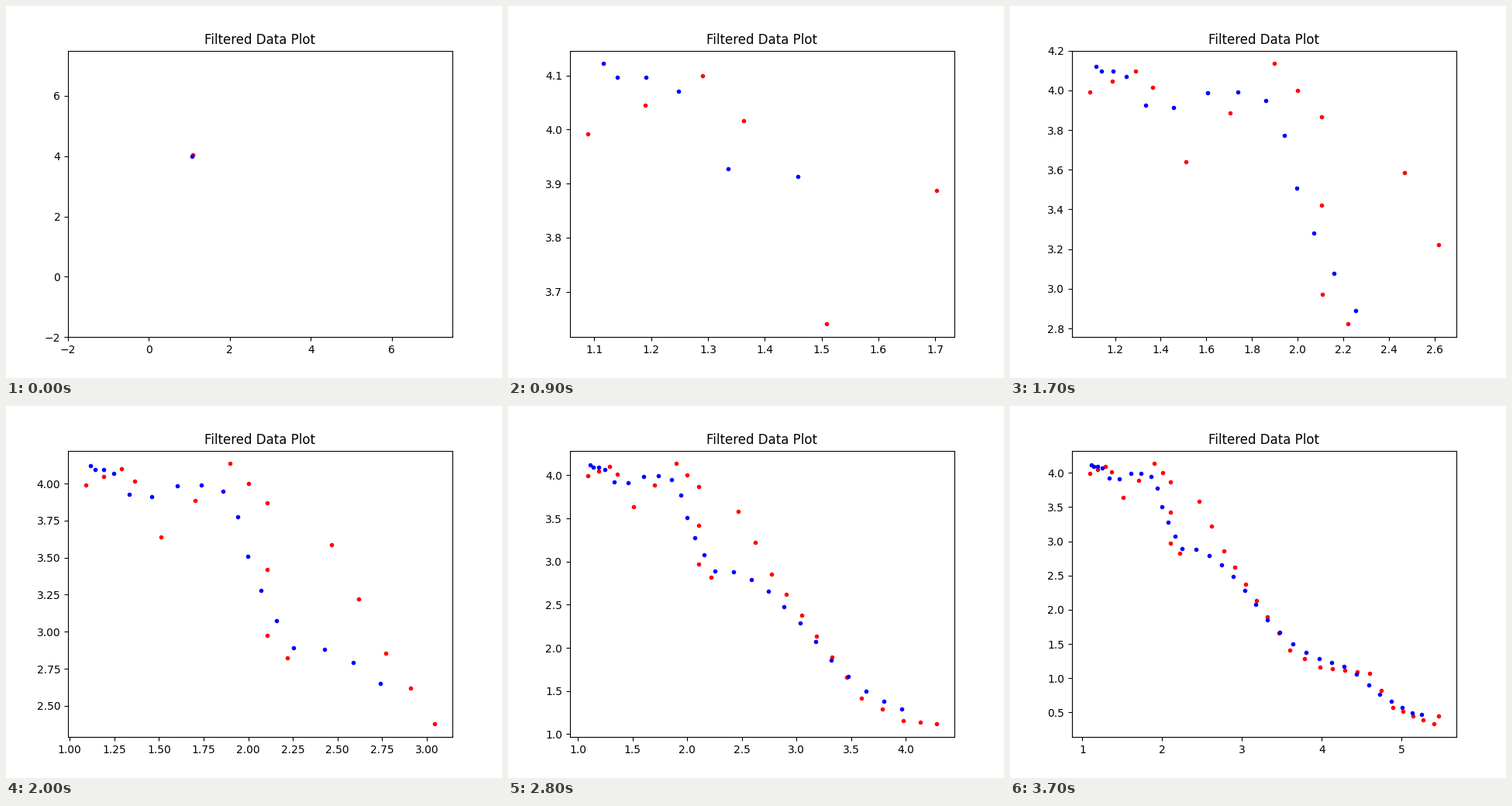
A matplotlib script that plays this animation: 640x480 px, repeating every 3.8 s.

```python
import numpy as np
import matplotlib.pyplot as plt
from matplotlib.animation import FuncAnimation

FRAMES, INTERVAL = 38, 100
WARM_UP = 4          # samples shown on fixed axes before the plot is cleared
SMOOTHING = 1 / 3
MAX_JUMP = 0.7       # larger prediction errors count as outliers

# Turning points of the measured track: sample number, x, y
TURNS = [
    (0, 1.088, 4.04), (3, 1.175, 4.345), (4, 1.088, 3.992), (6, 1.291, 4.099),
    (7, 1.363, 4.017), (8, 1.509, 3.64), (10, 1.897, 4.135), (12, 2.104, 3.868),
    (14, 2.107, 2.974), (15, 2.219, 2.822), (16, 2.466, 3.585),
    (18, 2.771, 2.857), (24, 3.595, 1.415), (26, 3.973, 1.159),
    (30, 4.594, 1.074), (32, 4.889, 0.574), (36, 5.4, 0.33), (37, 5.467, 0.443),
]


def measure():
    t, x, y = np.transpose(TURNS)
    samples = np.arange(FRAMES)
    return np.column_stack([np.interp(samples, t, x), np.interp(samples, t, y)])


def reject_outliers(samples):
    """Replace samples far from the linear prediction by that prediction."""
    clean = samples.copy()
    for i in range(2, len(clean)):
        predicted = 2 * clean[i - 1] - clean[i - 2]
        if np.hypot(*(clean[i] - predicted)) > MAX_JUMP:
            clean[i] = predicted
    return clean


def low_pass(samples, start):
    out = [np.array(start)]
    for sample in samples[1:]:
        out.append(out[-1] + SMOOTHING * (sample - out[-1]))
    return np.array(out)


measured = measure()
filtered = low_pass(reject_outliers(measured), (1.07, 3.99))

fig, ax = plt.subplots(figsize=(6.4, 4.8), dpi=100)


def update(frame):
    ax.clear()
    warming = frame < WARM_UP
    shown = slice(0 if warming else WARM_UP, frame + 1)
    ax.plot(*measured[shown].T, "r.")
    ax.plot(*filtered[shown].T, "b.")
    if warming:
        ax.set(xlim=(-2, 7.5), ylim=(-2, 7.5))
    ax.set_title("Filtered Data Plot")
    return ax.lines


anim = FuncAnimation(fig, update, frames=FRAMES, interval=INTERVAL,
                     init_func=lambda: [], repeat=True, repeat_delay=0)
plt.show()
```
